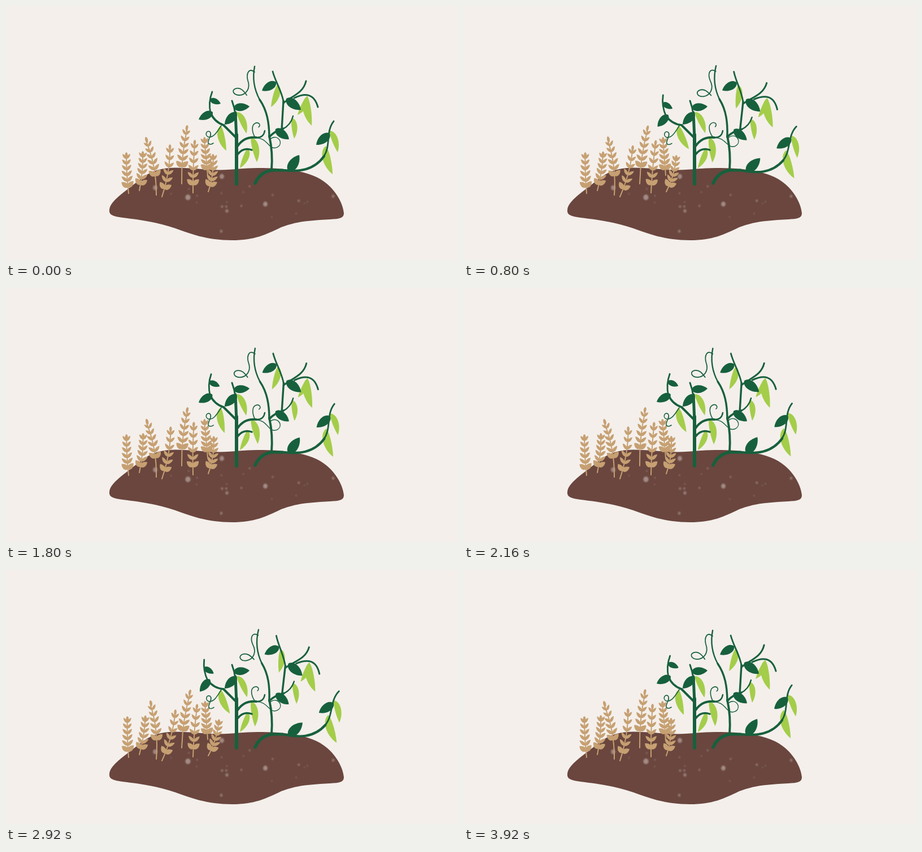
An HTML page for the animation above (3.96 s loop, 800 px wide and 450 px high).

```html
<!DOCTYPE html>
<html lang="en">
<head>
<meta charset="utf-8">
<title>Field plants</title>
<style>
html, body { margin: 0; width: 100%; height: 100%; overflow: hidden; background: #f4efeb; }
svg { display: block; width: 100vw; height: 100vh; }
</style>
</head>
<body>
<svg id="stage" viewBox="0 0 800 450"></svg>
<script>
const DARK = '#17603d', LIME = '#a4cd4a', WHEAT = '#c6a072', SOIL = '#6a463e';
const LOOP = 3960, STEP = 40, SWAY = 47.5, LEAD = 9.5;
const stage = document.getElementById('stage');
const movers = [];

function add(parent, tag, attrs = {}) {
  const el = document.createElementNS('http://www.w3.org/2000/svg', tag);
  for (const k in attrs) el.setAttribute(k, attrs[k]);
  parent.appendChild(el);
  return el;
}

// A group that swings by `angle` degrees around (x, y); `lead` shifts it ahead in the cycle.
function swing(parent, x, y, angle, lead = 0) {
  if (!angle) return parent;
  const el = add(parent, 'g');
  movers.push({ el, x, y, angle, lead });
  return el;
}

function line(parent, d, width, color = DARK) {
  return add(parent, 'path', { d, fill: 'none', stroke: color, 'stroke-width': width,
    'stroke-linecap': 'round', 'stroke-linejoin': 'round' });
}

// Point at share u of a segment, pushed sideways by k times its length.
const beside = (x1, y1, x2, y2, u, k) =>
  `${(x1 + (x2 - x1) * u - (y2 - y1) * k).toFixed(2)} ${(y1 + (y2 - y1) * u + (x2 - x1) * k).toFixed(2)}`;

function stem(parent, width, x1, y1, x2, y2, a = 0, b = a) {
  const at = (u, k) => beside(x1, y1, x2, y2, u, k);
  line(parent, `M${x1} ${y1}C${at(1 / 3, a)} ${at(2 / 3, b)} ${x2} ${y2}`, width);
}

// Two curves from base to tip, bulging by a and b times the length.
function blade(parent, fill, x1, y1, x2, y2, a, b) {
  const at = (u, k) => beside(x1, y1, x2, y2, u, k);
  add(parent, 'path', { fill,
    d: `M${x1} ${y1}C${at(.12, a)} ${at(.65, a)} ${x2} ${y2}C${at(.65, b)} ${at(.12, b)} ${x1} ${y1}Z` });
}

function leaf(parent, x1, y1, x2, y2, angle = 0) {
  blade(swing(parent, x1, y1, angle), DARK, x1, y1, x2, y2, .33, -.33);
}

// `side` is 1 when the pod's belly lies to the left of its hanging direction.
function pod(parent, x1, y1, x2, y2, side, angle = 0, lead = 0) {
  blade(swing(parent, x1, y1, angle, lead), LIME, x1, y1, x2, y2, .28 * side, -.08 * side);
}

function random(seed) {
  return () => (seed = seed * 16807 % 2147483647) / 2147483647;
}

function drawSoil() {
  add(stage, 'path', { fill: SOIL, d: 'M183 361C184 345 211 329 235 309C252 295 268 287 300 286.5' +
    'C330 286.5 352 290.5 378 290.5C405 290 420 287 445 287C510 287 545 296 568 315C588 332 597 354 598 367' +
    'C598 376 590 377 574 378C540 380 515 381 487 392C460 405 440 415 400 415C355 415 325 403 300 394' +
    'C262 381 228 378 200 374C187 372 182 369 183 361Z' });
  const soft = add(add(stage, 'defs'), 'filter', { id: 'soft' });
  add(soft, 'feGaussianBlur', { stdDeviation: 0.9 });
  const g = add(stage, 'g', { fill: '#b7a39d', filter: 'url(#soft)' });
  const speck = (x, y, r) =>
    add(g, 'ellipse', { cx: x, cy: y, rx: r, ry: r * 1.1, opacity: Math.min(.75, .2 + r * .13) });
  for (const [x, y, r] of [[322, 339, 4.6], [382, 302, 4], [264, 322, 3.8], [459, 351, 4],
    [391, 363, 2.8], [381, 399, 2.4], [579, 337, 2.4]]) speck(x, y, r);
  const rnd = random(77);
  for (let i = 0; i < 18; i++) {
    const a = rnd() * 2 * Math.PI, r = Math.sqrt(rnd());
    speck(400 + 165 * r * Math.cos(a), 350 + 38 * r * Math.sin(a), 1.2 + rnd());
  }
}

// Teardrop of the given length growing from (x, y).
function kernel(parent, x, y, dir, len, bulge) {
  blade(parent, WHEAT, x, y, x + len * Math.cos(dir), y + len * Math.sin(dir), bulge, -bulge);
}

// Stalk standing at (x, y): `lean` moves its top, `bend` its middle, the ear starts at share `from`.
function wheat(x, y, height, lean, bend, angle, from = .15, lead = 0) {
  const g = swing(stage, x, y, angle, lead);
  const mx = x + lean / 2 + bend, tx = x + lean, ty = y - height;
  line(g, `M${x} ${y}Q${mx} ${y - height / 2} ${tx} ${ty + 5}`, 2, WHEAT);
  const heading = u => Math.atan2(-height, 2 * ((1 - u) * (mx - x) + u * (tx - mx)));
  const pairs = 6;
  for (let i = 0; i < pairs; i++) {
    const k = i / (pairs - 1), u = from + (.84 - from) * k;
    const px = x + 2 * u * (1 - u) * (mx - x) + u * u * lean, py = y - height * u;
    for (const side of [-1, 1])
      kernel(g, px, py, heading(u) + side * (.82 - .14 * k), 14.5 - 3.5 * k, i ? .27 : .4);
  }
  kernel(g, tx, ty, heading(1) + Math.PI, 11, .28);
}

function drawWheat() {
  wheat(357, 300, 68, -6, 0, 1);
  wheat(311, 315, 104, 10, -6, 3.2, .29);
  wheat(236, 327, 70, 6, 4, 4);
  wheat(266, 335, 103, -19, 10, 4.6, .33);
  wheat(217, 332, 73, -4, -2, 1.5);
  wheat(276, 338, 93, 14, 8, 6.4);
  wheat(331, 331, 94, 1, -2, 5, .15, LEAD);
  wheat(358, 329, 67, 8, 7, 9.8);
}

function drawBush() {
  pod(stage, 380, 212, 386, 257, 1, -17, LEAD);
  pod(stage, 409, 188, 425, 226, -1, -3, LEAD);
  pod(stage, 434, 233, 446, 276, -1, 9, LEAD);
  pod(stage, 428, 252, 414, 287, -1);

  stem(stage, 6, 408, 315, 408, 228);
  stem(stage, 5, 408, 235, 406, 189);
  stem(stage, 3, 406, 192, 400, 168, .04);
  stem(stage, 4, 407, 233, 385, 211);
  stem(stage, 4, 410, 248, 443, 233, -.2);
  stem(stage, 2.4, 443, 233, 458, 221, .3);
  stem(stage, 3.4, 410, 263, 435, 255, -.25);
  leaf(stage, 403, 180, 431, 178);
  leaf(stage, 408, 189, 387, 210);

  const arm = swing(stage, 385, 211, -15);
  stem(arm, 3.6, 385, 211, 362, 189, -.15);
  stem(arm, 2.8, 362, 190, 365, 152, -.1);
  leaf(arm, 366, 188, 341, 201, -9);
  leaf(arm, 361, 165, 380, 173, 24);

  line(swing(stage, 381, 212, -2), 'M381 212C374 222 368 234 358 232C351 229 355 219 361 223' +
    'C366 228 356 238 358 243C360 246 364 245 367 243', 1.6);
  line(swing(stage, 440, 233, -11, LEAD), 'M441 233C436 224 435 211 442 208C449 205 453 212 448 215', 1.6);
  line(swing(stage, 441, 234, -6, LEAD), 'M441 234C455 233 460 242 466 248C474 257 487 251 485 241C482 233 474 231 467 237', 1.4);
}

function drawVine() {
  const low = swing(stage, 490, 291, 6.7);
  pod(low, 573, 221, 587, 259, -1);
  pod(low, 566, 248, 578, 298, 1, -10);
  stem(low, 4.2, 490, 291, 563, 266, .15, .24);
  stem(low, 2.8, 562, 267, 580, 204, .12, -.14);
  leaf(low, 573, 226, 549, 246);
  leaf(low, 500, 293, 519, 264, 7);
  stem(stage, 5.6, 441, 314, 470, 291, -.18);
  stem(stage, 5, 470, 291, 490, 291);
  stem(stage, 3.8, 470, 290, 466, 230, .05);

  const top = swing(stage, 466, 230, 3.3);
  pod(top, 481, 139, 469, 179, -1, -16);
  pod(top, 533, 160, 516, 193, -1, -6);
  pod(top, 533, 160, 541, 212, 1, -6);
  pod(top, 506, 198, 510, 235, -1, -7);

  stem(top, 3.4, 466, 230, 449, 166, .08, .12);
  stem(top, 2.4, 449, 166, 440, 107, -.12);
  line(swing(top, 440, 117, -12.5), 'M440 117C429 108 425 121 428 132C433 146 425 158 412 158' +
    'C401 157 399 148 407 146C416 144 421 151 426 158', 1.8);
  stem(top, 3.6, 466, 232, 491, 217, -.1);
  stem(top, 2.4, 490, 218, 508, 195, .15);
  stem(top, 3.4, 488, 219, 491, 168);
  stem(top, 2.8, 491, 169, 472, 116, .06, -.03);
  stem(top, 3, 491, 172, 531, 133, .02, .22);
  stem(top, 3, 510, 163, 552, 179, -.35, -.45);
  leaf(top, 478, 135, 453, 150);
  leaf(top, 496, 164, 522, 184);
  leaf(top, 477, 218, 501, 236);
}

function render(time) {
  // The sway advances one pose per step, holding one pose in every 24 steps.
  const slot = Math.floor((time % LOOP) / STEP);
  const n = slot - Math.floor((slot + 11) / 24);
  for (const m of movers) {
    const p = (1 - Math.cos(2 * Math.PI * (n - 1 + m.lead) / SWAY)) / 2;
    m.el.setAttribute('transform', `rotate(${(m.angle * p).toFixed(3)} ${m.x} ${m.y})`);
  }
}

drawSoil();
drawWheat();
drawBush();
drawVine();

const start = performance.now();
function tick() {
  render(performance.now() - start);
  requestAnimationFrame(tick);
}
tick();
</script>
</body>
</html>
```
